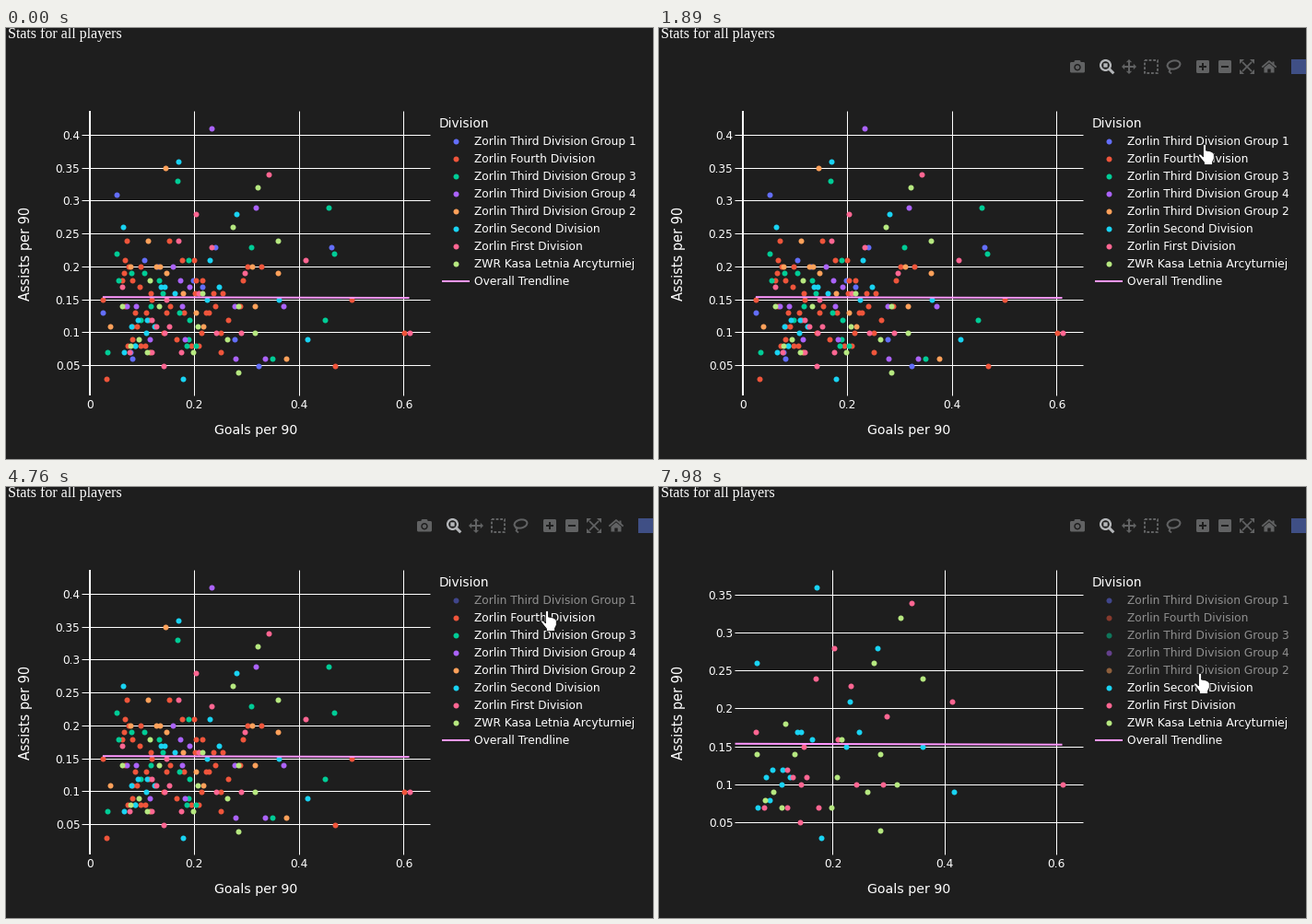
Write a matplotlib script that moves like this. It is 702 px wide and 468 px high and loops after 8 s.

```python
import numpy as np
import matplotlib.pyplot as plt
from matplotlib.animation import FuncAnimation
from matplotlib.patches import Circle, Ellipse, FancyBboxPatch, Polygon, Rectangle

W, H = 702, 468
LOOP_MS, STEP_MS = 8000, 40
BG, GREY, BRIGHT, PINK = "#1e1e1e", "#616263", "#b4b6b9", "#ff97ff"
LEFT, RIGHT, TOP, BOTTOM = 82, 460, 90, 399
# Pixels where the outermost visible dots land after autoscaling
DOT_LEFT, DOT_RIGHT, DOT_TOP, DOT_BOTTOM = 104.9, 437.5, 109.15, 380.85
TREND_X, TREND_Y = np.array([0.025, 0.61]), np.array([0.154, 0.1528])
HIDE_TIMES = [3900, 5180, 6120, 7180, 7980]

rng = np.random.default_rng(90)

# At dpi 72 one point is one pixel.
fig = plt.figure(figsize=(W / 72, H / 72), dpi=72, facecolor=BG)
ax = fig.add_axes([0, 0, 1, 1])
ax.set(xlim=(0, W), ylim=(H, 0))
ax.axis("off")


def label(x, y, text, size=12.3, **kw):
    kw = {"family": "DejaVu Sans", "color": "white", "va": "baseline", **kw}
    return ax.text(x, y, text, size=size, **kw)


def line(xs, ys, color="white", lw=1, **kw):
    return ax.plot(xs, ys, color=color, lw=lw, solid_capstyle="butt", **kw)[0]


series = []


def division(name, color, count, *outliers):
    """A random cloud of players plus the few that stand out from it."""
    goals = 0.045 + 0.33 * rng.beta(1.3, 2.2, count)
    assists = np.round(0.04 + 0.24 * rng.beta(1.8, 2.4, count), 2)
    points = np.vstack([np.column_stack([goals, assists]), outliers])
    k = len(series)
    y = 122.5 + 19 * k
    style = dict(ls="", marker="o", ms=6, mew=0, color=color)
    dots, = ax.plot([], [], zorder=3 + k / 10, **style)
    key, = ax.plot([487.5], [y], **style)
    series.append((points, dots, key, label(508, y + 4.5, name)))


division("Zorlin Third Division Group 1", "#636efa", 8,
         (0.026, 0.13), (0.052, 0.31), (0.461, 0.23), (0.323, 0.05))
division("Zorlin Fourth Division", "#ef553b", 46,
         (0.025, 0.15), (0.033, 0.03), (0.5, 0.15), (0.601, 0.1), (0.468, 0.05))
division("Zorlin Third Division Group 3", "#00cc96", 17,
         (0.0335, 0.07), (0.168, 0.33), (0.456, 0.29), (0.466, 0.22), (0.449, 0.12))
division("Zorlin Third Division Group 4", "#ab63fa", 11,
         (0.232, 0.41), (0.317, 0.29), (0.37, 0.14))
division("Zorlin Third Division Group 2", "#ffa15a", 12,
         (0.0385, 0.11), (0.145, 0.35), (0.376, 0.06))
division("Zorlin Second Division", "#19d3f3", 15,
         (0.17, 0.36), (0.28, 0.28), (0.416, 0.09), (0.179, 0.03))
division("Zorlin First Division", "#ff6692", 16,
         (0.341, 0.34), (0.61, 0.1), (0.413, 0.21), (0.202, 0.28))
division("ZWR Kasa Letnia Arcyturniej", "#b6e880", 13,
         (0.321, 0.32), (0.36, 0.24), (0.284, 0.04))


def autoscale(hidden):
    """Origin and pixels per unit of both axes for the visible divisions."""
    points = np.vstack([s[0] for s in series[hidden:]])
    (x_min, y_min), (x_max, y_max) = points.min(axis=0), points.max(axis=0)
    x_scale = min((DOT_RIGHT - DOT_LEFT) / (x_max - x_min),
                  (DOT_RIGHT - LEFT) / (x_max - TREND_X[0]))
    y_scale = (DOT_BOTTOM - DOT_TOP) / (y_max - y_min)
    return DOT_RIGHT - x_scale * x_max, x_scale, DOT_BOTTOM + y_scale * y_min, y_scale


VIEWS = [autoscale(n) for n in range(len(HIDE_TIMES) + 1)]

# Fixed text and legend
label(2, 11, "Stats for all players", 16, family="Liberation Serif")
label(271, 441.5, "Goals per 90", 14.1, ha="center")
label(29.5, 244.5, "Assists per 90", 14.5, rotation=90, ha="right", va="center")
label(470, 107.5, "Division", 13.7)
line([473, 503], [274.5, 274.5], PINK, 2)
label(508, 279, "Overall Trendline")

# Axes
x_ticks = [(v, line([], [], lw=1 if v else 2, zorder=1), label(0, 413, f"{v:g}", ha="center"))
           for v in np.arange(4) / 5]
y_ticks = [(v, line([], [], zorder=1), label(80.5, 0, f"{v:g}", 12.1, ha="right"))
           for v in np.arange(1, 9) / 20]
trend = line([], [], PINK, 2, zorder=5)
trend.set_clip_path(Rectangle((LEFT, TOP), RIGHT - LEFT, BOTTOM - TOP, transform=ax.transData))

# Mode bar
modebar = []


def shape(patch):
    modebar.append(ax.add_patch(patch))


def fill(points, color=GREY):
    shape(Polygon(points, fc=color, lw=0))


def box(x, y, w, h, color=GREY, r=1.5):
    shape(FancyBboxPatch((x + r, y + r), w - 2 * r, h - 2 * r,
                         boxstyle=f"round,pad={r}", fc=color, lw=0))


def stroke(xs, ys, color=GREY, lw=2, **kw):
    modebar.append(line(xs, ys, color, lw, **kw))


def arrow(x, y, dx, dy, size=3.2):
    """Arrow head with its tip at (x, y), pointing along (dx, dy)."""
    bx, by = x - dx * size, y - dy * size
    fill([(x, y), (bx - dy * size, by + dx * size), (bx + dy * size, by - dx * size)])


def draw_modebar():
    # camera
    box(446, 37, 16, 11.5)
    box(450.5, 35, 7, 5)
    shape(Circle((454, 42.7), 3.7, fc=BG, lw=0))
    shape(Circle((454, 42.7), 2.2, fc=GREY, lw=0))
    # zoom
    shape(Circle((484.5, 40.5), 5.4, fc="none", ec=BRIGHT, lw=2.3))
    stroke([488.5, 493.3], [44.5, 49.3], BRIGHT, 3)
    box(482.3, 38.3, 4.4, 4.4, BRIGHT, 0.3)
    # pan
    stroke([504, 516], [42, 42])
    stroke([510, 510], [36, 48])
    for dx, dy in ((1, 0), (-1, 0), (0, 1), (0, -1)):
        arrow(510 + 8 * dx, 42 + 8 * dy, dx, dy)
    # box select
    stroke([527, 541, 541, 527, 527], [35, 35, 49, 49, 35], ls=(0, (1.4, 0.9)))
    # lasso
    shape(Ellipse((558.5, 40), 14, 9, angle=-12, fc="none", ec=GREY, lw=2))
    stroke([552.5, 554.5, 553.5, 556], [43.5, 45.5, 47.5, 49.5], lw=1.8)
    # zoom in, zoom out
    for x in (583, 607):
        box(x, 35, 14, 14)
        stroke([x + 3, x + 11], [42, 42], BG)
    stroke([590, 590], [38, 46], BG)
    # autoscale
    stroke([633, 643], [37, 47], lw=1.7)
    stroke([633, 643], [47, 37], lw=1.7)
    for sx in (-1, 1):
        for sy in (-1, 1):
            cx, cy = 638 + 8 * sx, 42 + 8 * sy
            fill([(cx, cy), (cx - 5 * sx, cy), (cx, cy - 5 * sy)])
    # home
    stroke([654.3, 662, 669.7], [42.6, 36, 42.6], lw=1.8)
    fill([(656.5, 43), (662, 38.4), (667.5, 43), (667.5, 48.5), (656.5, 48.5)])
    box(660.3, 44.5, 3.4, 4.2, BG, 0.2)
    box(665.5, 36.5, 2, 4, r=0.2)
    # badge
    shape(Rectangle((686, 34), 16, 16, fc="#3f4f85", lw=0))


draw_modebar()

# Pointer shapes, relative to the tip
ARROW = np.array([(0, 0), (0, 16.5), (3.8, 13), (6.4, 19), (8.9, 18), (6.4, 12.2), (11.7, 12)])
HAND = np.array([(-1.5, 1), (0, 0), (1.5, 1), (1.5, 7), (6.5, 8), (9.3, 9.5), (10.2, 11),
                 (10.2, 16), (8.5, 19.5), (8.5, 22.5), (-0.5, 22.5), (-0.5, 20),
                 (-6.5, 12.5), (-6, 11), (-4, 11.2), (-1.5, 14)])
pointer = ax.add_patch(Polygon(ARROW, fc="white", ec="black", lw=0.7, zorder=9))

# Pointer tip: time, x, y
PATH = np.array([(290, 697, 300), (1050, 649, 348), (1260, 610, 325), (1700, 594, 155),
                 (1890, 592, 126), (2020, 592, 126), (2160, 587, 119), (3420, 587, 119),
                 (3700, 587, 134), (5180, 587, 134), (5390, 587, 155), (6120, 587, 155),
                 (6910, 587, 180), (7050, 587, 196), (7180, 587, 202)])


def draw_axes(x0, x_scale, y0, y_scale):
    # One-pixel grid lines sit on the pixel that contains them.
    for v, grid, text in x_ticks:
        x = x0 + x_scale * v
        grid.set_data([np.floor(x) if v else x] * 2, [TOP, BOTTOM])
        text.set_x(x)
        for part in (grid, text):
            part.set_visible(x >= LEFT)
    for v, grid, text in y_ticks:
        y = y0 - y_scale * v
        grid.set_data([LEFT, RIGHT], [np.floor(y)] * 2)
        text.set_y(y + 4.5)
        for part in (grid, text):
            part.set_visible(y >= TOP)


def update(i):
    t = (i + 0.5) * STEP_MS
    hidden = sum(t >= h for h in HIDE_TIMES)
    x0, x_scale, y0, y_scale = VIEWS[hidden]
    draw_axes(x0, x_scale, y0, y_scale)

    for k, (points, dots, key, name) in enumerate(series):
        dots.set_data(x0 + x_scale * points[:, 0], y0 - y_scale * points[:, 1])
        dots.set_visible(k >= hidden)
        for part in (key, name):
            part.set_alpha(1 if k >= hidden else 0.5)
    trend.set_data(x0 + x_scale * TREND_X, y0 - y_scale * TREND_Y)

    for part in modebar:
        part.set_alpha(np.clip((t - 290) / 300, 0, 1))

    x, y = (np.interp(t, PATH[:, 0], PATH[:, c]) for c in (1, 2))
    pointer.set_xy((HAND if y < 284 else ARROW) + (x, y))
    pointer.set_visible(t >= 290)


anim = FuncAnimation(fig, update, frames=LOOP_MS // STEP_MS, interval=STEP_MS,
                     repeat=True, repeat_delay=0)
plt.show()
```
